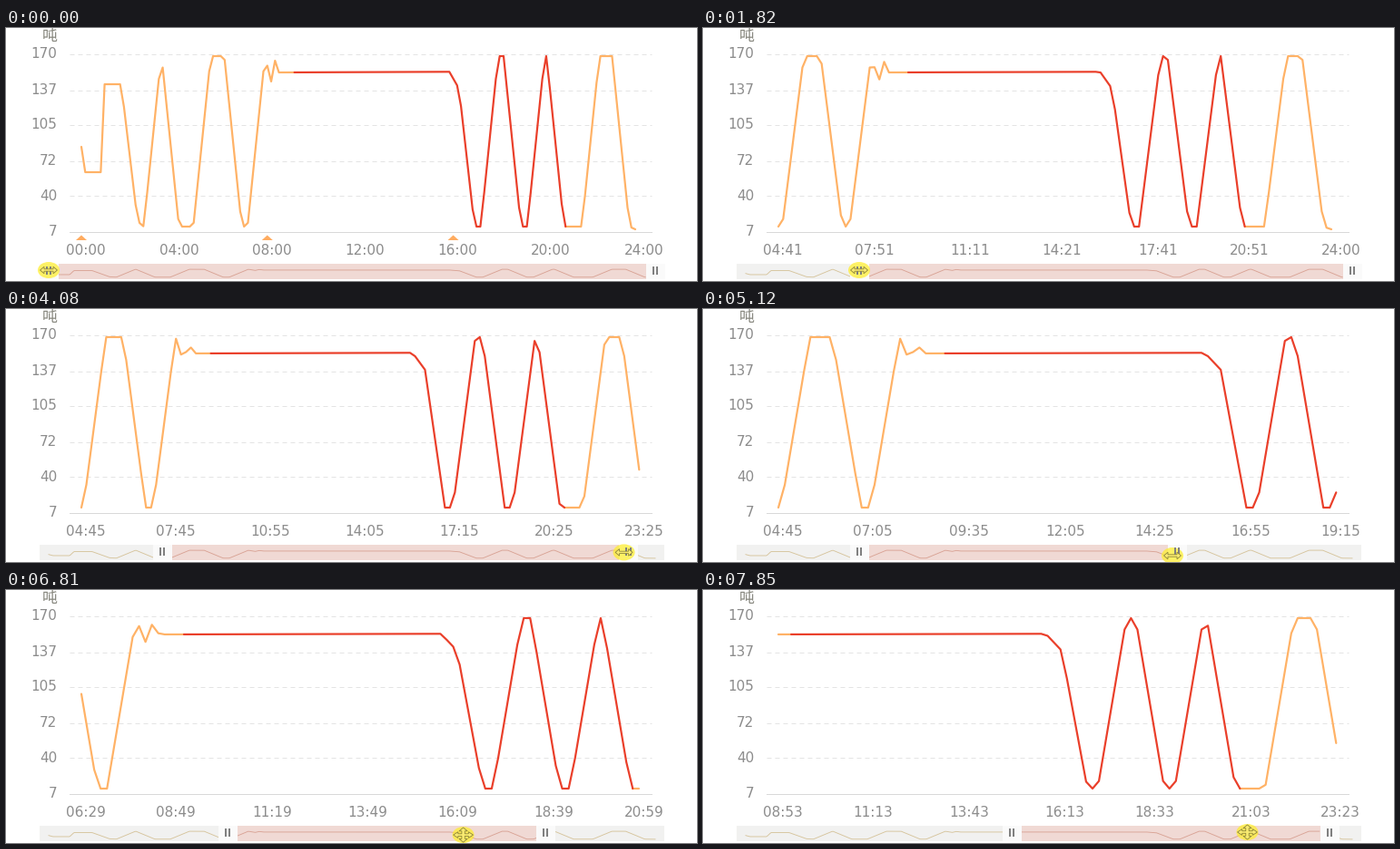
Recreate the animation shown at these times as a matplotlib script. Size 761 px wide and 279 px high, loop 8.45 s.

```python
import math
from itertools import cycle
import numpy as np
import matplotlib.pyplot as plt
from matplotlib.animation import FuncAnimation
from matplotlib.patches import Ellipse, Polygon, Rectangle

W, H, DPI = 761, 279, 64
PX = 72 / DPI  # points per pixel
LOOP, STEP = 8450, 50
DAY = 1440
X0, SPAN = 83, 614.3
TOP, LOW, SWEEP = 31, 219, 45
ORANGE, RED, GREY = "#ffb266", "#ea3f2a", "#8c8c8c"


def sweeps(*starts):
    """The level rises and falls in turn, always at the same rate."""
    for start, (a, b) in zip(starts, cycle([(LOW, TOP), (TOP, LOW)])):
        yield from ((start, a), (start + SWEEP, b))


# (minute of the day, height on the chart in pixels)
SERIES = np.array([
    (0, 131), (10, 159), (50, 159), (60, 62), (103, 62), (145, 213),
    *sweeps(161, 207, 289, 369, 429),
    (490, 59), (500, 36), (510, 49), (950, 48.3), (975, 67), (1015, LOW),
    *sweeps(1031, 1090, 1151, 1201, 1292, 1370), (1430, 222)])

# slider position and minute: readings are sparse in two stretches
PLACES, MINUTES = (47, 58, 340, 385, 715), (0, 110, 533, 950, DAY)


def level(minute):
    return np.interp(minute, SERIES[:, 0], SERIES[:, 1])


def to_minute(place):
    return float(np.interp(place, PLACES, MINUTES))


def glide(t, begin, end, a, b, power=1.0):
    u = min(max((t - begin) / (end - begin), 0), 1)
    return a + (b - a) * u ** power


def handles(t):
    if t > 5500:  # the whole window is dragged
        left = glide(t, 6150, 7850, 172, 340, 0.88)
        return left, left + 350
    return (glide(t, 280, 1800, 47, 172, 0.836),
            glide(t, 3650, 5100, 715, 522, 1.46))


def pointer(t, left, right):
    if t < 2500:
        return left, 267
    if t < 3400:
        hop = math.sin(math.pi * glide(t, 2500, 3350, 0, 1) ** 2)
        return glide(t, 2500, 3200, left, right - 4), 267 - 11 * hop
    if t < 5500:
        return right - 5, glide(t, 3650, 5100, 267, 272)
    grab = glide(t, 5470, 5720, 345, 259.5)
    return left + grab, glide(t, 6150, 7850, 272, 267)


def arrows(arms, shaft, neck, head, tip, sx=1.0, sy=1.0):
    """Outline of arrows leaving the centre in quarter turns."""
    arm = np.array([(shaft, -shaft), (neck, -shaft), (neck, -head), (tip, 0),
                    (neck, head), (neck, shaft), (shaft, shaft)])
    out = []
    for k in arms:
        c, s = round(math.cos(k * math.pi / 2)), round(math.sin(k * math.pi / 2))
        out.append(arm @ np.array([(c, s), (-s, c)]))
    return np.vstack(out) * (sx, sy)


RESIZE = arrows((0, 2), 1.2, 5, 3.8, 9.5)
MOVE = arrows((0, 1, 2, 3), 1.5, 5, 4, 9.5, 1.15, 0.85)

fig = plt.figure(figsize=(W / DPI, H / DPI), dpi=DPI, facecolor="white")
ax = fig.add_axes([0, 0, 1, 1])
ax.set_xlim(0, W)
ax.set_ylim(H, 0)
ax.axis("off")


def text(x, y, s, ha="center", font="DejaVu Sans", size=15.3, color=GREY):
    return ax.text(x, y, s, ha=ha, va="center", family=font,
                   fontsize=size * PX, color=color)


def line(color, width, z, cap="round"):
    return ax.plot([], [], color=color, lw=width * PX, zorder=z,
                   solid_joinstyle="round", solid_capstyle=cap)[0]


def box(x, width, color, z):
    patch = Rectangle((x, 260), width, 17, fc=color, ec="none", zorder=z)
    return ax.add_patch(patch)


# vertical axis
text(47.8, 8.8, "吨", font="Noto Sans CJK JP", size=17, color="#85857c")
for value in (170, 137, 105, 72, 40, 7):
    y = 225 - (value - 7) * 196 / 163
    text(56.5, y - 0.3, str(value), ha="right")
    last = value == 7
    ax.plot([70, 710.5], [y, y], color="#d9d9d9" if last else "#e4e4e4",
            lw=PX, ls="-" if last else (0, (5, 4)), zorder=1)

before, after = line(ORANGE, 2.2, 3), line(ORANGE, 2.2, 3)
middle = line(RED, 2.2, 4)
labels = [text(0, 245, "") for _ in range(7)]
marks = [ax.add_patch(Polygon(np.zeros((3, 2)), fc="#ffac60", ec="none"))
         for _ in range(3)]

# slider
box(37, 688, "#f1f1f0", 1)
selection = box(0, 0, "#f0d9d4", 2)
mini_x = np.linspace(47, 715, 500)
mini_y = 266 + (level((mini_x - 47) / 668 * DAY) - 29) / 196 * 9
ax.plot(mini_x, mini_y, color="#d6c49c", lw=0.9 * PX, zorder=1.5)
mini = line("#d9a395", 0.9, 3)
grips = [box(0, 21, "#fafafa", 4) for _ in range(2)]
bars = [line("#808080", 2, 7, "butt") for _ in range(4)]
glow = ax.add_patch(Ellipse((0, 0), 24, 18, fc="#ffee2c", ec="none",
                            alpha=0.72, zorder=6))
cursor = ax.add_patch(Polygon(RESIZE, fc="#f8ea70", ec="#8a8338",
                              lw=0.8 * PX, zorder=8))


def draw_chart(t, left, right):
    start = round(to_minute(left))
    if t >= 2000:
        start = max(start, 285)
    count = 87 if t > 5500 else math.ceil((to_minute(right) - start) / 10)

    index = np.arange(count + 1)
    index = index[start + 10 * index < DAY]
    minute = start + 10 * index
    x, y = X0 + SPAN * index / count, level(minute)
    first = np.searchsorted(minute, 544)
    stop = np.searchsorted(minute, 1258) - 1
    before.set_data(x[:first + 1], y[:first + 1])
    middle.set_data(x[first:stop + 1], y[first:stop + 1])
    after.set_data(x[stop:], y[stop:])

    for k, label in enumerate(labels):
        i = min((count + 1) * k // 6, count)
        hour, rest = divmod(min(start + 10 * i, DAY), 60)
        label.set_text(f"{hour:02d}:{rest:02d}")
        label.set_x(88 + SPAN * i / count)

    for k, mark in enumerate(marks):
        offset = 480 * k - start
        mark.set_visible(offset >= 0 and offset % 10 == 0)
        cx = X0 + SPAN * offset / 10 / count
        mark.set_xy([(cx - 6, 234), (cx, 228.5), (cx + 6, 234)])


def draw_slider(left, right):
    selection.set_x(left)
    selection.set_width(right - left)
    inside = (mini_x > left + 10) & (mini_x < right - 10)
    mini.set_data(mini_x[inside], mini_y[inside])
    for k, centre in enumerate((left, right)):
        grips[k].set_x(centre - 10.5)
        for j, dx in enumerate((-2.4, 2.4)):
            bars[2 * k + j].set_data([centre + dx] * 2, [262.5, 271.5])


def draw_pointer(t, left, right):
    centre = pointer(t, left, right)
    glow.set_center(centre)
    resizing = t < 2550 or 3400 <= t < 5500
    cursor.set_xy((RESIZE if resizing else MOVE) + centre)


def update(frame):
    t = frame * STEP
    left, right = handles(t)
    draw_chart(t, left, right)
    draw_slider(left, right)
    draw_pointer(t, left, right)
    return []


anim = FuncAnimation(fig, update, frames=LOOP // STEP, interval=STEP,
                     repeat=True, repeat_delay=0, blit=False)
plt.show()
```
